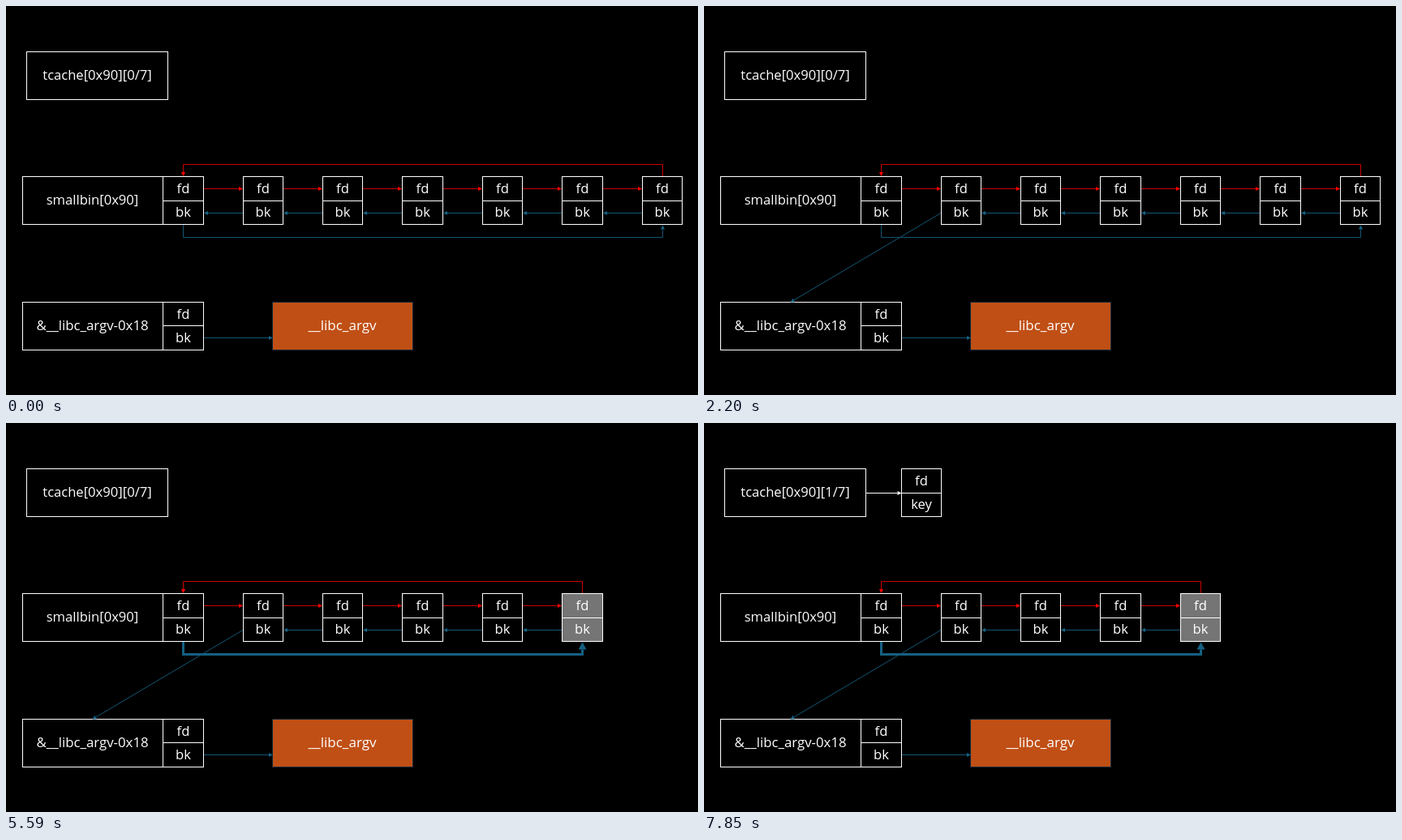
An HTML page with a canvas for the animation above (8000 ms loop, 853 px wide and 480 px high).

```html
<!DOCTYPE html>
<html lang="en">
<head>
<meta charset="utf-8">
<title>Bin lists</title>
<style>
html, body { margin: 0; width: 100%; height: 100%; overflow: hidden; background: #000; }
canvas { display: block; width: 853px; height: 480px; }
</style>
</head>
<body>
<canvas id="stage" width="853" height="480"></canvas>
<script>
const ctx = document.getElementById('stage').getContext('2d');
const LOOP = 8000;
const CUTS = [1070, 2200, 3330, 4460, 5590, 6720, 7850];
const WHITE = '#fff', RED = '#f00', BLUE = '#156082', GREY = '#757575';
const RED_LINE = '#c80000', BLUE_LINE = '#135674';

// Burst outline as x, y pairs in a 21600-unit square
const BURST = [
  11462, 4342, 14790, 0, 14525, 5777, 18007, 3172, 16380, 6532, 21600, 6645, 16985, 9402,
  18270, 11290, 16380, 12310, 18877, 15632, 14640, 14350, 14942, 17370, 12180, 15935,
  11612, 18842, 9872, 17370, 8700, 19712, 7527, 18125, 4917, 21600, 4805, 18240,
  1285, 17825, 3330, 15370, 0, 12877, 3935, 11592, 1172, 8270, 5372, 7817, 4502, 3625,
  8550, 6382, 9722, 1887
];

function label(str, x, y, size = 16.6) {
  ctx.font = `${size}px "Open Sans", "Noto Sans", sans-serif`;
  ctx.fillStyle = WHITE;
  ctx.fillText(str, x, y + 5.5);
}

function box(x1, y1, x2, y2, fill = '#000', stroke = WHITE) {
  ctx.fillStyle = fill;
  ctx.strokeStyle = stroke;
  ctx.lineWidth = 1;
  ctx.fillRect(x1 + .5, y1 + .5, x2 - x1, y2 - y1);
  ctx.strokeRect(x1 + .5, y1 + .5, x2 - x1, y2 - y1);
}

// Two stacked cells, 59 px tall
function cells(x1, x2, y, low, fill, split = 30) {
  box(x1, y, x2, y + 59, fill);
  ctx.fillStyle = WHITE;
  ctx.fillRect(x1, y + split, x2 - x1 + 1, 1);
  const mid = (x1 + x2 + 1) / 2;
  label('fd', mid, y + 15);
  label(low, mid, y + 44.5);
}

// Polyline ending in a filled arrowhead
function arrow(points, lineColor, headColor, width = 1, len = 5, half = 2.6) {
  const [x, y] = points[points.length - 1];
  const [px, py] = points[points.length - 2];
  const a = Math.atan2(y - py, x - px);
  const bx = x - len * Math.cos(a), by = y - len * Math.sin(a);
  const dx = half * Math.sin(a), dy = half * Math.cos(a);
  ctx.strokeStyle = lineColor;
  ctx.lineWidth = width;
  ctx.beginPath();
  points.slice(0, -1).forEach(p => ctx.lineTo(...p));
  ctx.lineTo(bx, by);
  ctx.stroke();
  ctx.fillStyle = headColor;
  ctx.beginPath();
  ctx.moveTo(x, y);
  ctx.lineTo(bx + dx, by - dy);
  ctx.lineTo(bx - dx, by + dy);
  ctx.fill();
}

const redArrow = points => arrow(points, RED_LINE, RED);
const blueArrow = points => arrow(points, BLUE_LINE, BLUE);

function cross(x, y, r) {
  ctx.strokeStyle = RED;
  ctx.lineWidth = 4;
  ctx.beginPath();
  for (const s of [-1, 1]) {
    ctx.moveTo(x - r, y - r * s);
    ctx.lineTo(x + r, y + r * s);
  }
  ctx.stroke();
}

function burst() {
  ctx.beginPath();
  for (let i = 0; i < BURST.length; i += 2) {
    const u = BURST[i] / 21600, v = BURST[i + 1] / 21600;
    ctx.lineTo(221.5 * u - 43.2 * v + 628.7, 69 * u + 144 * v - 6.6);
  }
  ctx.closePath();
  ctx.strokeStyle = WHITE;
  ctx.lineWidth = 1.4;
  ctx.stroke();
  label('malloc(0x80)', 707, 102.5, 15.2);
}

const chunkLeft = i => Math.floor(292.1 + 98.4 * i);
const chunkRight = i => Math.floor(341.5 + 98.4 * i);

function smallbin(step) {
  const count = step < 4 ? 6 : step < 6 ? 5 : 4;
  const marked = step === 3 || step === 5 || step === 7;

  box(20, 210, 193, 269);
  label('smallbin[0x90]', 106.5, 239.5);
  cells(193, 243, 210, 'bk');

  for (let i = 0; i < count; i++) {
    const last = i === count - 1;
    const left = chunkLeft(i), prev = i ? chunkRight(i - 1) : 243;
    cells(left, chunkRight(i), 210, 'bk', marked && last ? GREY : '#000');
    redArrow([[prev + 1, 225.5], [left, 225.5]]);
    if (i || step < 2) blueArrow([[left, 255.5], [prev + 1, 255.5]]);
  }

  const end = Math.floor(317 + 98.4 * (count - 1)) + .5;
  redArrow([[end, 210], [end, 195.5], [218.5, 195.5], [218.5, 210]]);
  const back = [[218.5, 270], [218.5, 285.5], [end, 285.5], [end, 270.5]];
  if (step === 5 || step === 7) arrow(back, BLUE, BLUE, 3, 9, 5);
  else blueArrow(back);

  if (step > 0) blueArrow([[292, 255.5], [106.5, 365.5]]);
  if (step === 1) cross(268, 254, 8);
}

function tcache(step) {
  const filled = step >= 6;
  box(25, 56, 199, 115);
  label(`tcache[0x90][${filled ? 1 : 0}/7]`, 112.5, 85.5);
  if (!filled) return;
  if (step === 6) cells(243, 292, 57, 'key', GREY, 29);
  else cells(243, 292, 56, 'key');
  arrow([[200, 86.5], [243.5, 86.5]], WHITE, WHITE);
}

function argv() {
  box(20, 365, 193, 424);
  label('&__libc_argv-0x18', 106.5, 394.5, 16.8);
  cells(193, 243, 365, 'bk', '#000', 29);
  box(328, 365, 501, 424, '#c04f15', '#0a2c3c');
  label('__libc_argv', 414.5, 394.5, 17);
  blueArrow([[244, 409.5], [329, 409.5]]);
}

function draw(time) {
  const t = time % LOOP;
  const step = CUTS.filter(cut => t >= cut).length;
  ctx.fillStyle = '#000';
  ctx.fillRect(0, 0, 853, 480);
  ctx.textAlign = 'center';
  ctx.textBaseline = 'alphabetic';
  tcache(step);
  argv();
  smallbin(step);
  if (step === 3 || step === 4) burst();
}

const start = performance.now();
function tick() {
  draw(performance.now() - start);
  requestAnimationFrame(tick);
}
tick();
</script>
</body>
</html>
```
